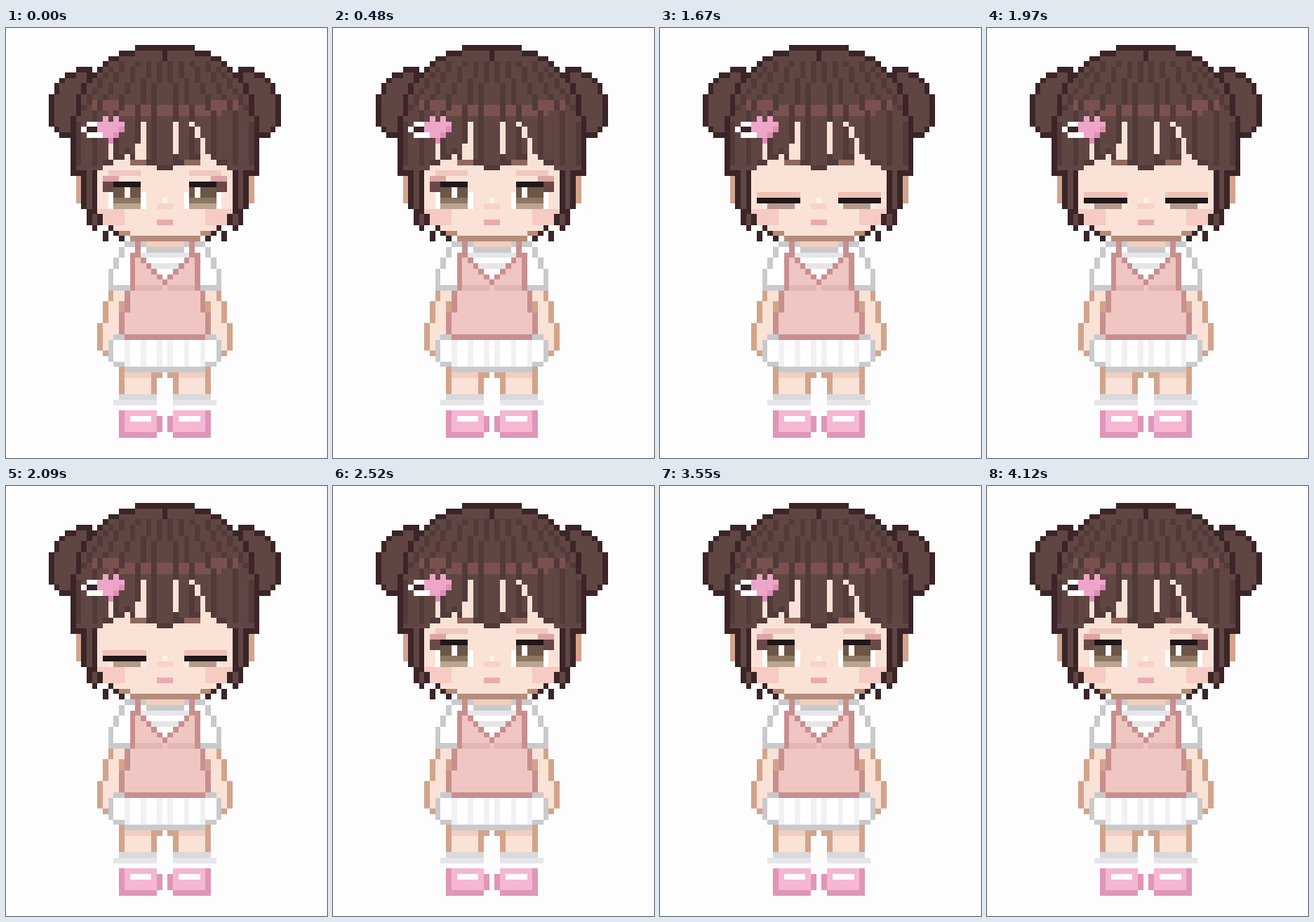
Animation, 398 px wide and 532 px high, one loop 4.18 s. Source, as an HTML page:

```html
<!DOCTYPE html>
<html lang="en">
<head>
<meta charset="utf-8">
<title>Blinking pixel girl</title>
<style>
  html, body { margin: 0; width: 100%; height: 100%; overflow: hidden; background: #fdfdfd; }
  svg { display: block; width: 100vw; height: 100vh; }
</style>
</head>
<body>
<svg viewBox="0 0 398 532" preserveAspectRatio="none" shape-rendering="crispEdges">
  <rect width="398" height="532" fill="#fdfdfd"/>
  <g id="stage" transform="translate(53 21) scale(6.7 6.75)"></g>
</svg>
<script>
const LOOP = 4180, CLOSE_AT = 1425, OPEN_AT = 2200;
const COLUMNS = 43, ROWS = 72, MIDDLE = COLUMNS / 2;

const C = {
  outline: '#3b2528', hair: '#604642', strand: '#523a39', band: '#7b5150',
  skin: '#fae2d6', skinShade: '#f1cfbf', skinLine: '#d2a48c', jaw: '#b58c7b', blush: '#f5cbc3',
  white: '#ffffff', grey: '#c9cacd', paleGrey: '#e6e6e9',
  vest: '#efc6c2', vestShade: '#e4b5b2', vestLine: '#c98f8e',
  shoe: '#f5b7d2', shoeLine: '#df96b9', lash: '#211719'
};

// A shape is a test that tells whether a point of the pixel grid lies inside it.
const box = (left, top, w, h) => (x, y) => x > left && x < left + w && y > top && y < top + h;
const oval = (cx, cy, rx, ry, power = 2) => (x, y) =>
  Math.abs((x - cx) / rx) ** power + Math.abs((y - cy) / ry) ** power < 1;
const stroke = (x1, y1, x2, y2) => (x, y) =>
  y > y1 && y < y2 && Math.floor(x1 + (x2 - x1) * (y - y1) / (y2 - y1)) === Math.floor(x);
const polygon = (...points) => (x, y) => {
  let inside = false;
  points.forEach(([ax, ay], i) => {
    const [bx, by] = points.at(i - 1);
    if (ay > y !== by > y && x < ax + (bx - ax) * (y - ay) / (by - ay)) inside = !inside;
  });
  return inside;
};
const both = shape => (x, y) => shape(MIDDLE - Math.abs(x - MIDDLE), y);
const edge = shape => (x, y) => shape(x, y) &&
  !(shape(x - 1, y) && shape(x + 1, y) && shape(x, y - 1) && shape(x, y + 1));

let cells;

function paint(color, shape, lineColor) {
  const border = edge(shape);
  for (let row = 0; row < ROWS; row++) {
    for (let col = 0; col < COLUMNS; col++) {
      const x = col + 0.5, y = row + 0.5;
      if (shape(x, y)) cells[row][col] = lineColor && border(x, y) ? lineColor : color;
    }
  }
}
const paintBoth = (color, shape, lineColor) => paint(color, both(shape), lineColor);

function drawBody() {
  paintBoth(C.skin, box(13, 58, 7, 8), C.skinLine);
  paintBoth(C.skinShade, box(14, 60, 5, 1));
  paintBoth(C.skinLine, box(20, 60, 1, 1));
  paintBoth(C.white, box(13, 64, 7, 4));
  paintBoth(C.paleGrey, box(12, 65, 8, 1));
  paintBoth('#d9d9db', box(13, 64, 7, 1));
  paintBoth(C.shoe, polygon([14, 67], [20, 67], [21, 68], [21, 71], [20, 72], [14, 72], [13, 71], [13, 68]), C.shoeLine);
  paintBoth(C.shoe, box(14, 67, 6, 1));
  paintBoth(C.white, box(15, 68, 4, 1));

  paintBoth(C.skin, polygon([12, 44], [15, 44], [14, 50], [13, 56], [10, 57], [9, 54], [10, 48]), C.skinLine);
  paintBoth(C.white, polygon([13, 53], [22, 53], [22, 60], [15, 60], [11, 58], [11, 55]), C.grey);
  for (const x of [14, 17, 20]) paintBoth('#f1f1f3', box(x, 54, 1, 5));

  paintBoth(C.white, polygon([14, 36], [22, 36], [22, 45], [11, 45], [11, 42], [13, 38]), C.grey);
  for (const y of [38, 40]) paint(C.paleGrey, box(17, y, 9, 1));
  paint(C.skinShade, box(18, 35, 7, 2));
  paint(C.grey, box(18, 37, 7, 1));

  paintBoth(C.vest, polygon([15, 39], [16, 38], [22, 43.6], [22, 54], [16, 54], [13, 53], [13, 49],
    [14, 49], [14, 45], [15, 45]), C.vestLine);
  paintBoth(C.vestShade, box(16, 44, 5, 1));
  paintBoth(C.vestLine, box(16, 36, 1, 3));
}

// Lower end of the fringe: a long middle lock and a shallow arch on each side.
function hairline(x) {
  const u = MIDDLE - Math.abs(x - MIDDLE);
  return u > 18.6 ? 23 - (u < 20) : 20 + 0.6 * Math.abs(u - 14.5);
}

function drawHair() {
  paintBoth(C.hair, polygon([6, 4], [8, 4], [9, 8], [7, 15], [4, 17], [2, 17], [0, 14], [0, 11], [1, 8], [4, 5]), C.outline);
  paintBoth(C.skin, box(5, 23, 3, 6), C.skinLine);

  const dome = oval(MIDDLE, 20, 17.5, 20, 2.5);
  paint(C.hair, (x, y) => y < 20 ? dome(x, y) : box(4, 19, 35, 5)(x, y), C.outline);
  const inner = oval(MIDDLE, 20, 16.4, 18.9, 2.5);
  paint(C.band, (x, y) => Math.abs(x - MIDDLE) < 14 &&
    Math.abs(y - 12 + 0.005 * (x - MIDDLE) ** 2) < 1.1);
  for (const spread of [2, 5, 9, 13, 16]) {
    paintBoth(C.strand, (x, y) => y > 3 && y < 22 && inner(x, y) &&
      Math.floor(MIDDLE - spread * Math.min(1, 0.45 + y / 24)) === Math.floor(x));
  }
  paint(C.outline, box(21, 1, 1, 2));
}

function drawFace() {
  const face = oval(MIDDLE, 23, 13.8, 13, 3);
  paint(C.skin, (x, y) => face(x, y) && y > hairline(x));
  paint(C.jaw, (x, y) => y > 32 && edge(face)(x, y));
  paint(C.strand, (x, y) => Math.abs(x - MIDDLE) < 12 && y < hairline(x) && y + 1 >= hairline(x));

  for (const [x1, y1, x2, y2] of [[17.5, 14, 17.5, 21], [16.5, 18, 16.5, 21], [11.8, 17, 11.2, 21],
    [23.5, 14, 23.5, 20], [26.5, 14, 29.5, 21]]) paint(C.skin, stroke(x1, y1, x2, y2));

  paintBoth(C.blush, oval(11.7, 31.5, 2.8, 2));
  paintBoth('#8e685f', box(15, 21, 3, 1));
  paint('#fff1e9', box(21, 28, 1, 1));
  paint('#f6d3c6', box(20, 29, 3, 1));
  paint('#eaabae', box(20, 32, 3, 1));
}

function drawOpenEyes() {
  paintBoth('#efc9c1', box(11, 23, 6, 1));
  paintBoth('#dba6a4', box(10, 24, 3, 1));
  paintBoth(C.white, box(11, 27, 7, 3));
  ['#6c5646', '#6c5646', '#8d7762', '#baa68f'].forEach((tone, i) => paintBoth(tone, box(12, 26 + i, 5, 1)));
  for (const x of [14, 27]) paint('#fffaf5', box(x, 26, 1, 2));
  paintBoth('#6b4848', box(10, 25, 2, 2));
  paintBoth(C.lash, box(12, 25, 5, 1));
}

function drawClosedEyes() {
  paintBoth('#efc1b7', box(10, 27, 8, 1));
  paintBoth(C.lash, box(10, 28, 8, 1));
  paintBoth('#faeae2', box(11, 29, 7, 1));
  paintBoth('#b39a89', box(12, 29, 5, 1));
}

function drawLocksAndClip() {
  paintBoth(C.hair, polygon([6, 23], [9, 23], [9, 29], [10, 32], [9, 34], [8, 34], [7, 31], [6, 29]), C.outline);
  paintBoth(C.hair, box(7, 22, 1, 6));
  paintBoth(C.outline, stroke(10.5, 34, 10.5, 36));
  paintBoth(C.outline, stroke(10.5, 33, 13.5, 36));

  paint(C.outline, box(6, 14, 4, 3), C.white);
  paint(C.hair, box(6, 14, 1, 1));
  paint(C.hair, box(6, 16, 1, 1));
  const heart = (x, y) => {
    const dx = Math.floor(x) - 11, dy = Math.floor(y) - 15;
    return dy >= -2 && Math.abs(dx) + Math.max(dy, 0) <= 2 && !(dy === -2 && dx % 2 === 0);
  };
  paint('#eda5c8', heart);
  paint('#df8db7', (x, y) => heart(x, y) && !heart(x + 1, y) && y > 15);
}

// Joins equal neighbours in each row and adds one path per colour.
function createSprite(drawEyes) {
  cells = Array.from({ length: ROWS }, () => Array(COLUMNS).fill(null));
  [drawBody, drawHair, drawFace, drawEyes, drawLocksAndClip].forEach(draw => draw());

  const paths = {};
  cells.forEach((line, row) => {
    for (let col = 0, end; col < COLUMNS; col = end) {
      end = col + 1;
      while (end < COLUMNS && line[end] === line[col]) end++;
      const color = line[col];
      if (color) paths[color] = (paths[color] || '') + `M${col} ${row}H${end}v1H${col}z`;
    }
  });
  const sprite = document.createElementNS('http://www.w3.org/2000/svg', 'g');
  sprite.innerHTML = Object.entries(paths).map(([color, d]) => `<path fill="${color}" d="${d}"/>`).join('');
  document.getElementById('stage').append(sprite);
  return sprite;
}

const awake = createSprite(drawOpenEyes);
const asleep = createSprite(drawClosedEyes);

function render(time) {
  const t = time % LOOP;
  const closed = t >= CLOSE_AT && t < OPEN_AT;
  awake.setAttribute('visibility', closed ? 'hidden' : 'visible');
  asleep.setAttribute('visibility', closed ? 'visible' : 'hidden');
}

const start = performance.now();
function tick() {
  render(performance.now() - start);
  requestAnimationFrame(tick);
}
tick();
</script>
</body>
</html>
```
